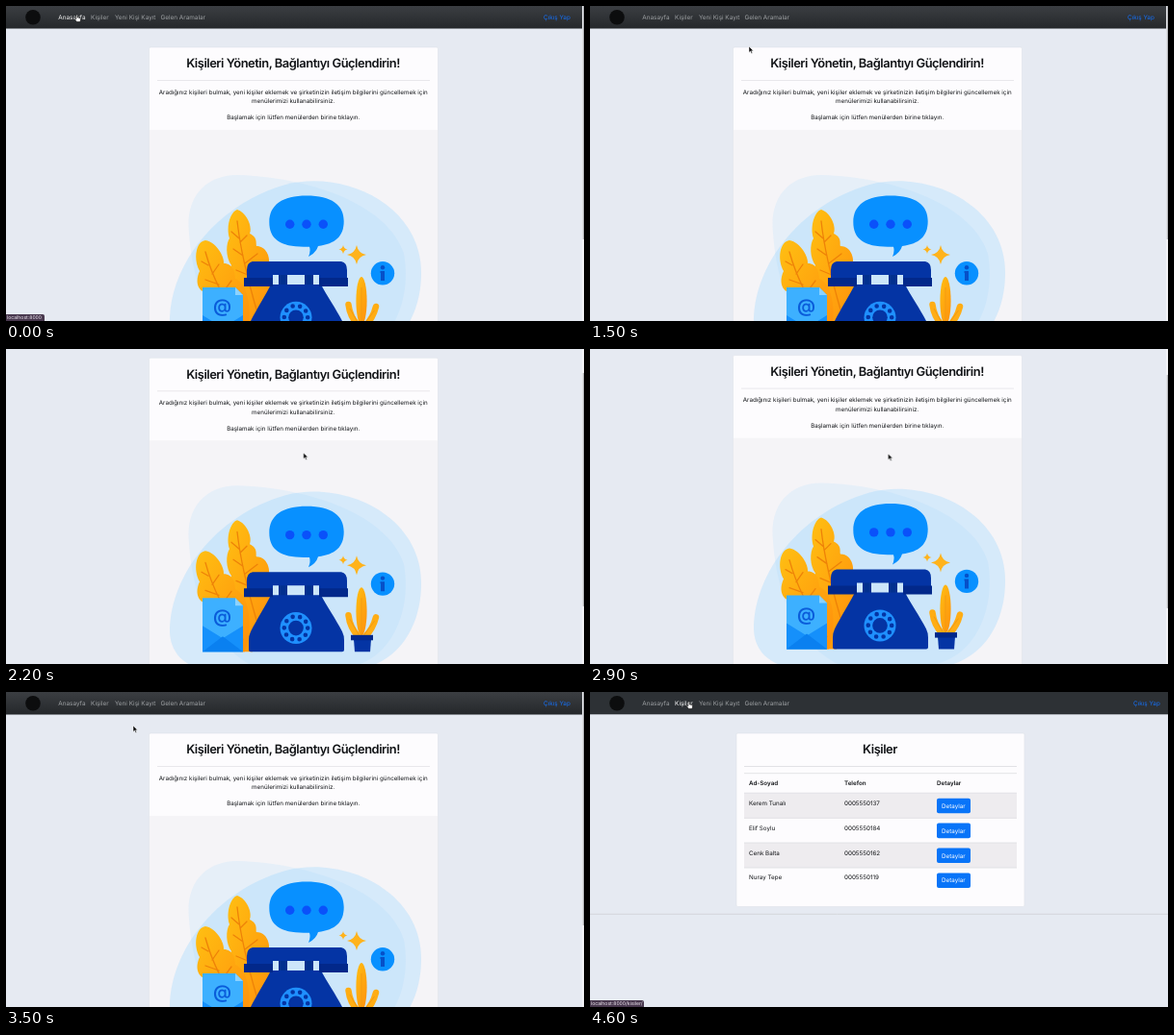
Recreate the animation shown at these times as an HTML page. Size 600 px wide and 328 px high, loop 5000 ms.

```html
<!DOCTYPE html>
<html lang="tr">
<head>
<meta charset="utf-8">
<title>Kişiler</title>
<style>
@property --scroll { syntax: "<length>"; inherits: true; initial-value: 0px; }
html, body { margin: 0; width: 100%; height: 100%; overflow: hidden; background: #e6eaf2; }
svg { display: block; width: 100%; height: 100%; animation: scroll 5s step-end infinite; }
text { font: 6.25px Inter, "Open Sans", sans-serif; fill: #111316; text-rendering: geometricPrecision; }
.title { font-size: 12.9px; font-weight: 600; letter-spacing: -.036em; }
.mid { text-anchor: middle; }
.head text { font-weight: 600; }
.nav text { font-size: 6.4px; fill: #9da0a3; }
.nav .logout { fill: #1670f5; }
.nav .link1, .nav .link2 { fill: var(--ink); }
.status text { font-size: 5.1px; fill: #eee6f0; }
.button text { fill: #fff; }
.page { transform: translateY(calc(-1 * var(--scroll))); }
.thumb { transform: translateY(calc(.74 * var(--scroll))); }
.home, .list, .shade, .logout, .link1, .link2, .status1, .status2, .arrow, .hand {
  animation: 5s step-end infinite;
}
.home { animation-name: home; }
.list { animation-name: list; }
.shade { animation-name: shade; }
.logout { animation-name: logout; }
.link1 { animation-name: link1; }
.link2 { animation-name: link2; }
.status1 { animation-name: status1; }
.status2 { animation-name: status2; }
.arrow { animation-name: arrow; }
.hand { animation-name: hand; }
.pointer { animation: pointer 5s linear infinite; }

@keyframes scroll {
  0%, 38% { --scroll: 0px; }
  40% { --scroll: 2px; }
  42% { --scroll: 17px; }
  44% { --scroll: 33.7px; }
  46% { --scroll: 36px; }
  58% { --scroll: 36.4px; }
  60% { --scroll: 29px; }
  62% { --scroll: 15px; }
  64% { --scroll: 4px; }
  66%, 100% { --scroll: 0px; }
}
@keyframes home { 0% { visibility: visible; } 90%, 100% { visibility: hidden; } }
@keyframes list { 0% { visibility: hidden; } 90%, 100% { visibility: visible; } }
@keyframes shade {
  0%, 66% { opacity: 1; }
  40%, 90%, 100% { opacity: 0; }
}
@keyframes logout { 0% { transform: none; } 90%, 100% { transform: translateX(6px); } }
@keyframes link1 { 0% { --ink: #f4f4f4; } 20% { --ink: #b5b7b9; } 26%, 100% { --ink: #9da0a3; } }
@keyframes link2 {
  0%, 26% { --ink: #9da0a3; }
  20% { --ink: #dedfe0; }
  80%, 100% { --ink: #fff; }
}
@keyframes status1 { 0% { visibility: visible; } 24%, 100% { visibility: hidden; } }
@keyframes status2 { 0% { visibility: hidden; } 80%, 100% { visibility: visible; } }
@keyframes arrow { 0%, 80%, 100% { visibility: hidden; } 24% { visibility: visible; } }
@keyframes hand { 0%, 80%, 100% { visibility: visible; } 24% { visibility: hidden; } }
@keyframes pointer {
  0% { transform: translate(73px, 9px); animation-timing-function: steps(10); }
  20% { transform: translate(74px, 9px); animation-timing-function: steps(5); }
  30% { transform: translate(165px, 42px); animation-timing-function: steps(4); }
  38% { transform: translate(308px, 107px); animation-timing-function: steps(6); }
  50% { transform: translate(309.5px, 109px); animation-timing-function: step-end; }
  64% { transform: translate(309.5px, 109px); animation-timing-function: steps(3); }
  70% { transform: translate(132px, 35px); animation-timing-function: steps(5); }
  80%, 100% { transform: translate(102px, 10px); }
}
</style>
</head>
<body>
<svg viewBox="0 0 600 328">
  <defs>
    <linearGradient id="navShade" x2="0" y2="1">
      <stop stop-color="#3b3e42"/><stop offset="1" stop-color="#25282b"/>
    </linearGradient>
    <linearGradient id="gold" x2=".8" y2="1">
      <stop stop-color="#ffbf12"/><stop offset="1" stop-color="#ff930c"/>
    </linearGradient>
    <g id="button" class="button">
      <rect x="360" y="110.7" width="35" height="15.6" rx="2" fill="#0874f8"/>
      <text x="365" y="120.8">Detaylar</text>
    </g>
    <path id="spark" d="M0 -10Q1.5 -1.5 10 0Q1.5 1.5 0 10Q-1.5 1.5 -10 0Q-1.5 -1.5 0 -10Z" fill="#ffb31c"/>
  </defs>

  <rect width="600" height="328" fill="#e6eaf2"/>

  <g class="page">
    <g class="nav">
      <rect width="600" height="23.3" fill="#2d3135"/>
      <rect class="shade" width="598" height="23.3" fill="url(#navShade)"/>
      <circle cx="28" cy="11.7" r="7.8" fill="#0c0d0e"/>
      <text class="link1" x="54.3" y="14.3">Anasayfa</text>
      <text class="link2" x="88" y="14.3">Kişiler</text>
      <text x="113" y="14.3">Yeni Kişi Kayıt</text>
      <text x="160.5" y="14.3">Gelen Aramalar</text>
      <text class="logout" x="558" y="14.3">Çıkış Yap</text>
    </g>

    <g class="home">
      <rect x="148.5" y="43" width="300" height="400" rx="1.5" fill="#fdfcfe" stroke="#dfe2e9" stroke-width=".6"/>
      <text class="title mid" x="298" y="64.3">Kişileri Yönetin, Bağlantıyı Güçlendirin!</text>
      <path d="M157 77.5H440" stroke="#e4e3e6" stroke-width=".8"/>
      <g class="mid">
        <text x="298.2" y="91.5">Aradığınız kişileri bulmak, yeni kişiler eklemek ve şirketinizin iletişim bilgilerini güncellemek için</text>
        <text x="298.2" y="101.4">menülerimizi kullanabilirsiniz.</text>
        <text x="298.2" y="118.3">Başlamak için lütfen menülerden birine tıklayın.</text>
      </g>
      <rect x="149" y="129" width="299" height="314" fill="#f5f4f7"/>

      <g transform="translate(0 36)">
        <g fill="#8fd0ff">
          <path d="M190 200C186 162 208 140 240 140C318 142 398 172 413 222C422 270 400 331 340 331H262C216 310 194 260 190 200Z" opacity=".15"/>
          <path d="M170 288C172 235 215 172 290 150C350 134 431 170 431 242C431 288 406 331 350 334H215C186 330 169 315 170 288Z" opacity=".3"/>
        </g>

        <!-- leaves -->
        <g fill="url(#gold)">
          <path d="M243 313C236 280 228 248 234 234C228 226 228 212 232 206C228 194 233 178 240 176C250 179 256 194 253 201C262 205 259 212 260 214C273 214 277 233 269 240C278 250 276 270 266 280L256 313Z"/>
          <path d="M246 313C214 308 199 276 206 262C196 258 198 246 201 240C194 228 197 209 207 208C219 210 227 226 226 232C236 232 238 242 238 248C254 254 256 290 248 313Z"/>
        </g>
        <g fill="none" stroke="#ee8208" stroke-width="1.3" stroke-linecap="round">
          <path d="M240 188Q244 225 260 280M242 206L234 199M243 210L250 203M246 224L236 217M248 232L261 222M251 244L239 239M253 250L266 243"/>
          <path d="M207 220Q217 257 246 300M210 234L203 230M214 243L221 233M221 254L207 249M226 261L234 250M232 270L213 268M237 278L244 264"/>
        </g>

        <!-- speech bubble -->
        <path d="M312 161.5C338 161.5 350.7 171 350.7 188C350.7 204 342 211.5 324 214Q322 221 314 225Q316.500 219 315 214.700H309C285 214.500 273.300 207 273.300 189C273.300 171 287 161.500 312 161.500Z" fill="#0890ff"/>
        <g fill="#0a51fa">
          <circle cx="294.7" cy="191.3" r="4.7"/><circle cx="312" cy="191.3" r="4.7"/><circle cx="329.3" cy="191.3" r="4.7"/>
        </g>
        <use href="#spark" x="364" y="223"/>
        <use href="#spark" transform="translate(350 217.5) scale(.45)"/>

        <circle cx="391" cy="242.3" r="12.2" fill="#0890ff"/>
        <g fill="#0650c8">
          <circle cx="391" cy="236.3" r="2.2"/>
          <path d="M388.500 240H393V250H389V242H388.500Z"/>
        </g>

        <!-- telephone -->
        <path d="M283 243H292V256H283ZM310 243H319V256H310Z" fill="#02308f"/>
        <path d="M275 254H327C332 264 343 280 349 292Q351 296 351 301V311Q351 313 349 313H254Q252 313 252 311V301Q252 296 254 292C260 280 270 264 275 254Z" fill="#0434a4"/>
        <path d="M256 230H348Q354 231 354 239V248H325V244H277V248H250V239Q250 231 256 230Z" fill="#0434a4"/>
        <path d="M247 247H277V256H247ZM325 247H355V256H325Z" fill="#02288a"/>
        <circle cx="301" cy="288.3" r="16.5" fill="#1f90ff"/>
        <circle cx="301" cy="288.3" r="12.2" fill="none" stroke="#0434a4" stroke-width="4.6" stroke-linecap="round" stroke-dasharray="0 7.67"/>
        <circle cx="301" cy="288.3" r="7.8" fill="#0434a4"/>

        <!-- letter -->
        <path d="M204 257H238L246 265V313H204Z" fill="#3db0ff"/>
        <path d="M238 257V265H246Z" fill="#8bd2ff"/>
        <text class="mid" x="224.5" y="283" style="font-size:19px;font-weight:600;fill:#0a5cda">@</text>
        <path d="M204 286L225 299L246 286V313H204Z" fill="#1590fb"/>
        <path d="M204 313L225 297L246 313Z" fill="#0a80f0"/>

        <!-- plant -->
        <ellipse cx="369" cy="271" rx="5.6" ry="25" fill="url(#gold)"/>
        <path d="M355.500 275Q357 288 366 297M384 277Q381 289 373 297" fill="none" stroke="#ffad14" stroke-width="6.500" stroke-linecap="round"/>
        <path d="M369 257V295M357 279L366 295M382.500 281L372 295" stroke="#f39a12" fill="none"/>
        <path d="M361 300H379L378 313H362Z" fill="#0434a4"/>
        <rect x="358" y="295.5" width="23" height="5.5" fill="#02288a"/>
      </g>
    </g>

    <g class="list">
      <rect x="152" y="43" width="299" height="180.5" rx="1.5" fill="#fdfcfe" stroke="#dfe2e9" stroke-width=".6"/>
      <text class="title mid" x="301" y="64.3">Kişiler</text>
      <path d="M160 105.5H443V131.3H160ZM160 157H443V183H160Z" fill="#eeecef"/>
      <path d="M160 77.5H443M160 84.7H443M160 105.2H443M160 131.3H443M160 157H443M160 183H443" stroke="#dcdce0" stroke-width=".8"/>
      <g class="head">
        <text x="165" y="97.2">Ad-Soyad</text><text x="264" y="97.2">Telefon</text><text x="360" y="97.2">Detaylar</text>
      </g>
      <g>
        <text x="165" y="117.8">Kerem Tunalı</text><text x="264" y="117.8">0005550137</text><use href="#button"/>
      </g>
      <g transform="translate(0 25.9)">
        <text x="165" y="117.8">Elif Soylu</text><text x="264" y="117.8">0005550184</text><use href="#button"/>
      </g>
      <g transform="translate(0 51.8)">
        <text x="165" y="117.8">Cenk Balta</text><text x="264" y="117.8">0005550162</text><use href="#button"/>
      </g>
      <g transform="translate(0 77.7)">
        <text x="165" y="117.8">Nuray Tepe</text><text x="264" y="117.8">0005550119</text><use href="#button"/>
      </g>
      <path d="M0 231.3H600" stroke="#d3d5db"/>
    </g>
  </g>

  <g class="home">
    <rect x="598" width="2" height="328" fill="#f3f4f7"/>
    <rect class="thumb" x="598.7" width="1.3" height="243" fill="#b7b9be"/>
  </g>

  <g class="status status1">
    <path d="M0 321H38Q40 321 40 323V328H0Z" fill="#49394f"/>
    <text x="1" y="326.4">localhost:8000</text>
  </g>
  <g class="status status2">
    <path d="M0 321H54Q56 321 56 323V328H0Z" fill="#49394f"/>
    <text x="1" y="326.4">localhost:8000/kisiler/</text>
  </g>

  <g class="pointer">
    <path class="arrow" d="M0 0V6.4L1.5 5.1L2.6 7.6L3.7 7.1L2.6 4.7H4.6Z" fill="#08090a" stroke="#fff" stroke-width=".5"/>
    <path class="hand" d="M0 .5Q.7 -.4 1.4 .5V3L4 3.5Q4.8 3.8 4.6 5L4 7.5H.6L-1.8 4.6Q-1.6 3.5 0 4.5Z" fill="#fff" stroke="#111" stroke-width=".6"/>
  </g>
</svg>
</body>
</html>
```
